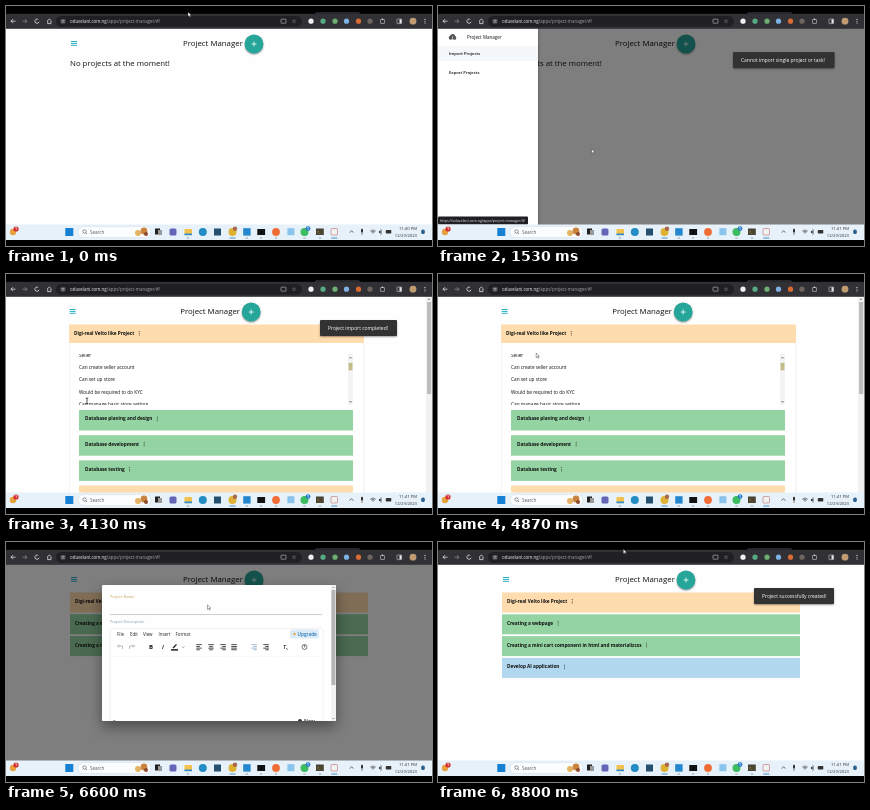
Write an HTML page with a canvas that moves like this. It is 426 px wide and 240 px high and loops after 8.87 s.

```html
<!DOCTYPE html>
<html lang="en">
<head>
<meta charset="utf-8">
<title>Project Manager</title>
<style>
html, body { margin: 0; width: 100%; height: 100%; overflow: hidden; background: #000; }
canvas { display: block; width: 100vw; height: 100vh; }
</style>
</head>
<body>
<canvas id="stage"></canvas>
<script>
const W = 426, H = 240, LOOP = 8870, STEP = 1000 / 15;
const FONT = '"Open Sans", "Noto Sans", sans-serif';
const TEAL = '#26a69a', PEACH = '#ffdcae', GREEN = '#94d3a2', BLUE = '#b1d8ee';
const SITE = 'oduvelani.com.ng';
const canvas = document.getElementById('stage');
const c = canvas.getContext('2d');

const clamp = v => Math.max(0, Math.min(1, v));
const ease = v => 1 - Math.pow(1 - clamp(v), 3);
const smooth = v => { v = clamp(v); return v * v * (3 - 2 * v); };
const rise = (t, start, dur) => ease((t - start) / dur);
const pulse = (t, on, off, dur = 200) => rise(t, on, dur) * (1 - rise(t, off, dur));
const within = (t, a, b) => t >= a && t < b;

function box(x, y, w, h, fill) {
  c.fillStyle = fill;
  c.fillRect(x, y, w, h);
}
function pill(x, y, w, h, r, fill, stroke) {
  c.beginPath();
  c.roundRect(x, y, w, h, r);
  if (fill) { c.fillStyle = fill; c.fill(); }
  if (stroke) { c.strokeStyle = stroke; c.lineWidth = 0.5; c.stroke(); }
}
function dot(x, y, r, fill) {
  c.beginPath();
  c.arc(x, y, r, 0, 7);
  c.fillStyle = fill;
  c.fill();
}
function line(color, width, ...p) {
  c.beginPath();
  c.moveTo(p[0], p[1]);
  for (let i = 2; i < p.length; i += 2) c.lineTo(p[i], p[i + 1]);
  c.strokeStyle = color;
  c.lineWidth = width;
  c.stroke();
}
// Text is placed by its vertical middle; returns the width.
function text(s, x, y, size, fill = '#111', weight = 400, align = 'left') {
  c.font = `${weight} ${size}px ${FONT}`;
  c.textAlign = align;
  c.textBaseline = 'alphabetic';
  c.fillStyle = fill;
  c.fillText(s, x, y + size * 0.36);
  return c.measureText(s).width;
}
function clipped(x, y, w, h, draw) {
  c.save();
  c.beginPath();
  c.rect(x, y, w, h);
  c.clip();
  draw();
  c.restore();
}
function withShadow(blur, draw, drop = 1) {
  const scale = canvas.width / W;
  c.save();
  c.shadowColor = 'rgba(0,0,0,.4)';
  c.shadowBlur = blur * scale;
  c.shadowOffsetY = drop * scale;
  draw();
  c.restore();
}

function row(x, y, w, h, fill, label, textY, indent = 5) {
  box(x, y, w, h, fill);
  const end = x + indent + text(label, x + indent, textY, 4.7, '#111', 700);
  for (let i = -1; i <= 1; i++) dot(end + 5, textY + i * 1.8, 0.5, '#333');
}

function header(dx) {
  for (let i = 0; i < 3; i++) box(65 + dx / 2, 35 + i * 1.9, 6, 1, '#2bb0c4');
  text('Project Manager', 177 + dx, 37.4, 7.83);
  withShadow(2, () => dot(248 + dx, 38, 9.4, TEAL));
  line('#fff', 0.8, 245.6 + dx, 38, 250.4 + dx, 38);
  line('#fff', 0.8, 248 + dx, 35.6, 248 + dx, 40.4);
}

function details(t, open) {
  clipped(63, 69, 296, 300 * open, () => {
    box(63, 69, 295, 300, '#fff');
    line('#e2e2e2', 0.5, 63.2, 69, 63.2, 240);
    line('#e2e2e2', 0.5, 357.8, 69, 357.8, 240);
    const scroll = 7 * smooth((t - 3900) / 200) + 40 * pulse(t, 4300, 4650);
    clipped(72, 80, 275, 51, () => {
      const lines = ['Seller', 'Can create seller account', 'Can set up store',
        'Would be required to do KYC', 'Can manage basic store setting',
        'Can create product', 'Can manage orders', 'Can view sales'];
      lines.forEach((s, i) => text(s, 73, 88 - scroll + i * 12.3, 4.75));
    });
    box(342, 80, 5, 51, '#f4f4f4');
    box(342.5, 88.5 + scroll / 20, 4, 7.5, '#c3bd8c');
    line('#555', 0.7, 343.3, 84.5, 344.5, 83, 345.7, 84.5);
    line('#555', 0.7, 343.3, 127, 344.5, 128.5, 345.7, 127);
    ['Database planing and design', 'Database development', 'Database testing']
      .forEach((s, i) => row(73, 136 + i * 25.2, 274, 20.5, GREEN, s, 144.8 + i * 25.2, 6));
    row(73, 211.5, 274, 20.5, PEACH, 'Interface design', 221, 6);
  });
}

function page(t) {
  box(0, 22, W, 197, '#fefefe');
  const imported = t >= 2930;
  const open = pulse(t, 3650, 4950);
  const long = open > 0.3;
  header(long ? -2.8 : 0);
  if (!imported) {
    text('No projects at the moment!', 64, 57.4, 7.8);
    return;
  }
  const x = long ? 63 : 64, w = long ? 295 : 298;
  row(x, 50.5, w, long ? 18.5 : 20, PEACH, 'Digi-real Velto like Project', 59.3);
  const shift = 300 * open;
  const rest = [['Creating a webpage', GREEN],
    ['Creating a mini cart component in html and materializcss', GREEN]];
  if (t >= 8270) rest.push(['Develop AI application', BLUE]);
  rest.forEach(([s, color], i) => {
    const y = 72.3 + i * 21.8 + shift;
    row(x, y, w, 20, color, s, y + 8.8);
  });
  if (open > 0) details(t, open);
  if (long) {
    box(420, 22, 6, 197, '#f1f1f1');
    box(421, 28, 4.2, 92, '#bdbdbd');
    line('#666', 0.7, 422, 26, 423, 24.8, 424, 26);
  }
}

function shade(amount) {
  if (amount > 0) box(0, 22, W, 197, `rgba(0,0,0,${0.5 * amount})`);
}

function sidenav(t, open) {
  if (open <= 0) return;
  c.save();
  c.translate(-104 * (1 - open), 0);
  withShadow(3, () => box(0, 22, 100, 197, '#fff'));
  dot(12.7, 31.8, 2, '#555');
  dot(16.4, 31.9, 1.9, '#555');
  dot(14.7, 30.4, 2.5, '#555');
  line('#fff', 0.6, 14.6, 33, 14.6, 30.3);
  text('Project Manager', 29, 31, 4.55);
  if (t > 880) box(0, 40, 100, 15, '#f4f8fa');
  text('Import Projects', 11, 47, 4.2, '#111', 600);
  text('Export Projects', 11, 66.3, 4.2, '#111', 600);
  c.restore();
}

function toast(t, x, w, label, on, off) {
  if (!within(t, on, off)) return;
  const show = rise(t, on, 200), leave = smooth((t - off + 250) / 250);
  c.save();
  c.globalAlpha = show * (1 - leave);
  c.translate(0, 20 * (1 - show) - 20 * leave);
  withShadow(2, () => pill(x, 46, w, 16, 1, '#323232'));
  text(label, x + 8, 54, 4.95, '#fff');
  c.restore();
}

function statusBar() {
  pill(0, 210.5, 90, 8, 1, '#202024');
  text(`https://${SITE}/apps/project-manager/#!`, 2, 214.4, 3.6, '#e5e5e5');
}

function editor() {
  pill(104, 86.5, 213, 100, 2, '#fff', '#e3e3e3');
  [['File', 111], ['Edit', 124], ['View', 137], ['Insert', 152.5], ['Format', 169.5]]
    .forEach(([s, x]) => text(s, x, 92.3, 4.4, '#222'));
  pill(284, 87.5, 29, 9, 1.5, '#dcebf7');
  dot(288.5, 92, 1.2, '#e7a33a');
  text('Upgrade', 291.5, 92, 4.7, '#2876b5', 600);
  const y = 105;
  for (const [x, s] of [[114, 1], [126, -1]]) {
    line('#aaa', 0.8, x + 2.5 * s, y + 2, x + 2.5 * s, y - 1, x - 2.5 * s, y - 1);
    line('#aaa', 0.8, x - s, y - 2.5, x - 2.5 * s, y - 1, x - s, y + 0.5);
  }
  text('B', 143, y, 6, '#111', 700);
  text('I', 156, y, 6, '#111', 'italic 600');
  line('#222', 1.2, 167, y + 1, 170.5, y - 2.5);
  box(165, y + 2.2, 7, 1.4, '#111');
  line('#555', 0.6, 176, y - 0.6, 177.2, y + 0.6, 178.4, y - 0.6);
  [193, 205, 217, 228, 248, 260].forEach((x, k) => {
    const color = k === 4 ? '#8fa9c8' : '#222';
    for (let i = 0; i < 4; i++) {
      const len = k === 3 || i % 2 === 0 ? 5.5 : 3.5;
      const lead = k === 1 ? (5.5 - len) / 2 : k === 2 || k > 3 ? 5.5 - len : 0;
      box(x - 2.7 + lead, y - 2.7 + i * 1.7, len, 0.8, color);
    }
  });
  text('T', 277, y, 5.6, '#222', 'italic 600');
  line('#222', 0.6, 280, y + 1, 282, y + 2.8);
  c.beginPath();
  c.arc(298.5, y, 2.5, 0, 7);
  c.stroke();
  text('?', 298.5, y, 3.8, '#222', 700, 'center');
  c.setLineDash([1, 2]);
  line('#d8d8d8', 0.5, 106, 114.5, 315, 114.5);
  c.setLineDash([]);
  text('p', 107, 179, 4.5, '#222');
  dot(294, 179, 2, '#333');
  text('New', 298, 179, 5, '#222', 600);
}

function modal(t, open) {
  if (open <= 0) return;
  c.save();
  c.globalAlpha = open;
  c.translate(213, 111 - 10 * (1 - open));
  c.scale(0.8 + 0.2 * open, 0.8 + 0.2 * open);
  c.translate(-213, -111);
  withShadow(14, () => pill(96, 43, 234, 136, 1, '#fefefe'), 6);
  const scroll = 30 * smooth((t - 7870) / 170);
  clipped(96, 43, 229, 136, () => {
    c.translate(0, -scroll);
    const typed = 'Develop AI application'.slice(0, Math.max(0, Math.floor((t - 6860) / 36)));
    const focus = t > 6750;
    text('Project Name', 104, 54.7, 3.9, '#c9a35e');
    const end = 104 + text(typed, 104, 65.5, 5.1);
    if (focus) line('#222', 0.5, end + 0.3, 62.5, end + 0.3, 68.5);
    box(104, 72.5, 212, focus ? 1 : 0.5, focus ? TEAL : '#9e9e9e');
    text('Project Description', 104, 80, 3.9, '#7f9fae');
    editor();
    pill(286, 193, 30, 11, 1, TEAL);
    text('CREATE', 301, 198.5, 4.4, '#fff', 400, 'center');
  });
  box(325, 43, 5, 136, '#f1f1f1');
  box(325.4, 48 + scroll, 4, 95, '#b5b5b5');
  line('#666', 0.6, 326.4, 46, 327.4, 45, 328.4, 46);
  line('#666', 0.6, 326.4, 176, 327.4, 177, 328.4, 176);
  c.restore();
}

function toolbar() {
  box(0, 0, W, 9, '#000');
  pill(309, 6, 45, 4, 1.5, '#26262b');
  box(0, 7.8, W, 15, '#313135');
  pill(50, 10, 246, 10.8, 5.4, '#202023');
  const ink = '#e3e3e3', y = 15.2;
  line(ink, 0.8, 9.5, y, 5, y);
  line(ink, 0.8, 7, y - 2, 5, y, 7, y + 2);
  line('#888', 0.8, 16.5, y, 21, y);
  line('#888', 0.8, 19, y - 2, 21, y, 19, y + 2);
  c.beginPath();
  c.arc(31, y, 2.1, 0.3, 5.3);
  c.strokeStyle = ink;
  c.stroke();
  line(ink, 0.8, 41, y, 43.3, y - 2.2, 45.6, y);
  line(ink, 0.8, 41.7, y, 41.7, y + 2.4, 44.9, y + 2.4, 44.9, y);
  dot(57, y, 2.8, '#444448');
  line(ink, 0.6, 55.5, y - 0.8, 58.5, y - 0.8);
  line(ink, 0.6, 55.5, y + 0.8, 58.5, y + 0.8);
  const w = text(SITE, 64, y, 4.45, '#eee');
  text('/apps/project-manager/#!', 64 + w, y, 4.45, '#a2a2a2');
  pill(275, y - 2, 5, 4, 0.5, null, ink);
  text('☆', 288, y, 5.5, ink, 400, 'center');
  [['#f0f0f0', 305], ['#55a983', 317], ['#6fae72', 329], ['#7fb0e6', 340.5],
    ['#d96b32', 352.5], ['#6d655e', 364]].forEach(([color, x]) => dot(x, y, 2.6, color));
  pill(374.5, y - 1.7, 4, 4, 0.4, null, ink);
  dot(376.5, y - 2, 0.8, ink);
  pill(391, y - 2.2, 4.6, 4.6, 0.4, null, ink);
  box(393.5, y - 2, 2, 4.2, ink);
  dot(407, y, 3.4, '#c09a70');
  for (let i = -1; i <= 1; i++) dot(419, y + i * 1.8, 0.55, ink);
}

function taskbar(t) {
  box(0, 218.5, W, 15.5, '#e7f1f9');
  box(0, 234, W, 6, '#000');
  const y = 226, ink = '#333';
  dot(7, 226, 3.2, '#e6a23c');
  dot(10, 223, 2.6, '#d32f2f');
  text('1', 10, 223, 3.5, '#fff', 700, 'center');
  box(59.3, 222, 8, 8, '#1680d2');
  pill(72, 220.6, 73, 11, 5.5, '#fbfdff', '#cfd9e0');
  c.beginPath();
  c.arc(78.5, 225.5, 1.7, 0, 7);
  c.strokeStyle = ink;
  c.stroke();
  line(ink, 0.6, 79.8, 226.8, 81, 228);
  text('Search', 84, 226, 4.5, '#555');
  dot(132, 227, 3, '#e4b263');
  dot(138, 225, 3.4, '#c98540');
  dot(140, 228, 2, '#8f4a30');
  box(149, 222.5, 5, 6, '#222');
  box(152, 224, 4, 5, '#9a9a9a');
  pill(163.5, 222.5, 7, 7, 1.5, '#6467b8');
  pill(178.5, 223, 7.5, 6.2, 0.7, '#f3c24d');
  box(178.5, 227.5, 7.5, 1.7, '#2c8fd8');
  dot(196.8, y, 4, '#218dc4');
  box(208, 222.5, 7, 7, '#25506f');
  dot(226.5, y, 4, '#e0b234');
  dot(229, 222.8, 2.2, '#a8684d');
  box(237.2, 222.2, 7.4, 7.4, '#2586d0');
  box(251.3, 223, 7.8, 6, '#111');
  dot(270, y, 3.9, '#f06d37');
  box(281.4, 222.2, 7, 7, '#8ac4ec');
  dot(298.5, y, 4, '#3dbd60');
  dot(302, 222.6, 2.4, '#247bc7');
  text('1', 302, 222.6, 3.3, '#fff', 700, 'center');
  box(310, 222.5, 7.8, 6.5, '#4a4330');
  text('>_', 311, 225.5, 3.5, '#f1d16a');
  pill(325, 222.5, 6.5, 6.5, 1, '#f1f1f1', '#b05656');
  [182, 240.8, 255, 270, 298.5, 314].forEach(x => box(x - 1.2, 231.6, 2.4, 0.8, '#82909a'));
  [226.5, 328.3].forEach(x => box(x - 3, 231.6, 6, 0.8, '#277cba'));
  line(ink, 0.7, 343.5, 226.5, 345.5, 224.8, 347.5, 226.5);
  pill(355, 222.8, 2, 4, 1, ink);
  line(ink, 0.6, 356, 227, 356, 229);
  for (let r = 1; r < 4; r++) {
    c.beginPath();
    c.arc(367, 228, r * 1.3, -2.35, -0.79);
    c.stroke();
  }
  box(373, 225, 1.5, 2, ink);
  line(ink, 0.8, 375, 223.5, 375, 228.5);
  pill(379.8, 224, 5.5, 3.6, 0.8, ink);
  text(t < 1000 ? '11:40 PM' : '11:41 PM', 411, 222.9, 4.2, ink, 400, 'right');
  text('12/29/2023', 411, 229, 4.2, ink, 400, 'right');
  pill(415.2, 223.5, 3.6, 4.6, 1.5, '#2d5f8c');
}

function folder(x, y, fill = '#f0c24f') {
  pill(x, y - 2, 4.8, 4, 0.4, fill);
}

function dialog(t) {
  if (!within(t, 1670, 2800)) return;
  const picked = t >= 2270, ink = '#222';
  c.save();
  c.globalAlpha = rise(t, 1670, 130);
  withShadow(16, () => pill(1.5, 6.5, 209.5, 145.5, 2, '#f8f9fa'), 7);
  line('#555', 0.6, 9, 12, 6, 12, 7.3, 10.7);
  line('#aaa', 0.6, 17, 12, 20, 12, 18.7, 10.7);
  line('#555', 0.6, 41, 13.4, 41, 10.5, 39.8, 11.7);
  line(TEAL, 1, 54, 10, 54, 13.5);
  text('›   Downloads   ›', 59, 12, 4.1, ink);
  line('#777', 0.5, 117.5, 11.5, 119, 13, 120.5, 11.5);
  c.beginPath();
  c.arc(131, 12, 1.6, 0.3, 5.3);
  c.stroke();
  pill(136, 7.8, 69, 8.8, 1, '#fff', '#ddd');
  text('Search Downloads', 143, 12.2, 4, '#777');
  text('Organize ▾', 8, 25.5, 4.1, '#365f85');
  text('New folder', 38, 25.5, 4.1, '#365f85');
  for (let i = 0; i < 3; i++) box(171.5, 23.8 + i * 1.5, 4.5, 0.6, '#666');
  pill(190, 23.3, 4.5, 4, 0.3, null, '#2389cc');
  dot(202.5, 25.4, 2.2, '#2384c6');
  box(2, 31, 209, 96, '#fff');
  line('#e2e2e2', 0.5, 2, 31, 211, 31);

  pill(4, 55, 47, 10, 1, '#cfdcf0');
  [['Home', 39, '#e1a258'], ['Gallery', 49.5, '#4b9fd0'], ['Zalimor - Perso', 60, '#2787cf'],
    ['Desktop', 81.5, '#389bbd'], ['Downloads', 92, '#349a86'],
    ['Documents', 102.7, '#7d94a9'], ['Pictures', 113.3, '#469bd0']].forEach(([s, y, color]) => {
    folder(13, y, color);
    text(s, 20, y, 4.1, ink);
    if (y > 70) line('#777', 0.6, 44.5, y + 1.2, 46.5, y - 1);
  });
  line('#ddd', 0.5, 6, 70.5, 50, 70.5);
  box(51, 32, 3, 93, '#f2f2f2');
  box(51.4, 36, 2.2, 32, '#999');

  clipped(55, 31.5, 63, 94, () => {
    if (picked) box(61, 97.3, 57, 10, '#cce3f5');
    text('Name', 66, 35.7, 4, '#666');
    [['Last week', 54], ['Earlier this month', 82.5]].forEach(([s, y]) => {
      line('#666', 0.5, 57, y - 0.6, 58.3, y + 0.6, 59.6, y - 0.6);
      text(s, 63, y, 4.1, '#36658d');
    });
    [[SITE, 44.5], ['socialpack_2', 63.3], ['chatuniverse_2', 72.7], ['nigeria-stats-and-lgas', 92],
      ['projects_2023-12-07T23-28-13.0472', 102.3], ['projects_2023-12-07T01-08-42.0316', 113]]
      .forEach(([s, y], i) => {
        folder(62, y, i < 3 ? '#f0c24f' : '#d7dce1');
        text(s, 68, y, 3.95, ink);
      });
    box(62, 120, 13, 2, '#75a9cc');
  });
  box(118, 32, 3.5, 93, '#f2f2f2');
  box(118.5, 39.5, 2.5, 9.5, '#777');
  text('No preview available', 167, 77, 4, '#888', 400, 'center');

  text('File name:', 43, 133, 3.9, ink);
  pill(62, 129, 77, 8, 0.5, '#fff', '#bbb');
  if (picked) text('projects_2023-12-07T23-28-13.0472', 63, 133, 3.9, ink);
  pill(141, 129, 63, 8, 0.5, '#fff', '#bbb');
  text('JSON File', 142.5, 133, 4, ink);
  for (const x of [134, 199]) line('#555', 0.5, x, 132.5, x + 1.5, 133.8, x + 3, 132.5);
  pill(141.5, 139, 30, 8.5, 1, '#e2f0fa', '#2384c6');
  text('Open', 156.8, 143.2, 4.1, ink, 400, 'center');
  pill(174.5, 139, 31, 8.5, 1, '#fdfdfd', '#ccc');
  text('Cancel', 190, 143.2, 4.1, ink, 400, 'center');
  c.restore();
}

// Pointer stops: arrive time, x, y.
const PATH = [[0, 182, 6], [120, 182, 6], [480, 68, 37], [720, 68, 37], [980, 28, 48],
  [1180, 28, 48], [1480, 153.5, 143], [1800, 153.5, 143], [2200, 92, 102], [2330, 92, 102],
  [2600, 160, 144], [2860, 160, 144], [3500, 105, 60], [3750, 105, 60], [4000, 81, 127],
  [4750, 81, 127], [4930, 105, 60], [5150, 105, 60], [5650, 177.5, 5.5], [5780, 177.5, 5.5],
  [6150, 248, 38], [6350, 248, 38], [6700, 190, 69], [7800, 190, 69], [8080, 300, 168],
  [8300, 300, 168], [8700, 191, 9], [8870, 182, 6]];

function pointer(t) {
  const i = Math.max(1, PATH.findIndex(p => p[0] > t));
  const [t0, x0, y0] = PATH[i - 1], [t1, x1, y1] = PATH[i];
  const k = smooth((t - t0) / (t1 - t0));
  const x = x0 + (x1 - x0) * k, y = y0 + (y1 - y0) * k;
  if (within(t, 3940, 4800) || within(t, 6650, 7840)) {
    line('#111', 0.7, x, y - 2.8, x, y + 2.8);
    line('#111', 0.7, x - 1.3, y - 2.8, x + 1.3, y - 2.8);
    line('#111', 0.7, x - 1.3, y + 2.8, x + 1.3, y + 2.8);
    return;
  }
  c.beginPath();
  [[0, 0], [0, 4.6], [1.1, 3.6], [1.9, 5.2], [2.6, 4.9], [1.9, 3.4], [3.3, 3.3]]
    .forEach(([dx, dy]) => c.lineTo(x + dx, y + dy));
  c.closePath();
  c.fillStyle = '#fff';
  c.strokeStyle = '#222';
  c.lineWidth = 0.4;
  c.fill();
  c.stroke();
}

function draw(t) {
  const menu = pulse(t, 560, 2850), form = pulse(t, 6220, 8220);
  page(t);
  shade(Math.max(menu, form));
  sidenav(t, menu);
  modal(t, form);
  toast(t, 295, 101.5, 'Cannot import single project or task!', 1130, 2450);
  toast(t, 314, 77, 'Project import completed!', 2980, 4650);
  toast(t, 316, 80, 'Project successfully created!', 8300, 9300);
  if (within(t, 880, 2900)) statusBar();
  toolbar();
  taskbar(t);
  dialog(t);
  pointer(t);
}

function resize() {
  const dpr = window.devicePixelRatio || 1;
  canvas.width = Math.round(innerWidth * dpr) || W;
  canvas.height = Math.round(innerHeight * dpr) || H;
}
addEventListener('resize', resize);
resize();

const start = performance.now();
function tick() {
  const t = (performance.now() - start) % LOOP;
  c.setTransform(canvas.width / W, 0, 0, canvas.height / H, 0, 0);
  draw(Math.floor(t / STEP + 0.05) * STEP);
  requestAnimationFrame(tick);
}
tick();
</script>
</body>
</html>
```
